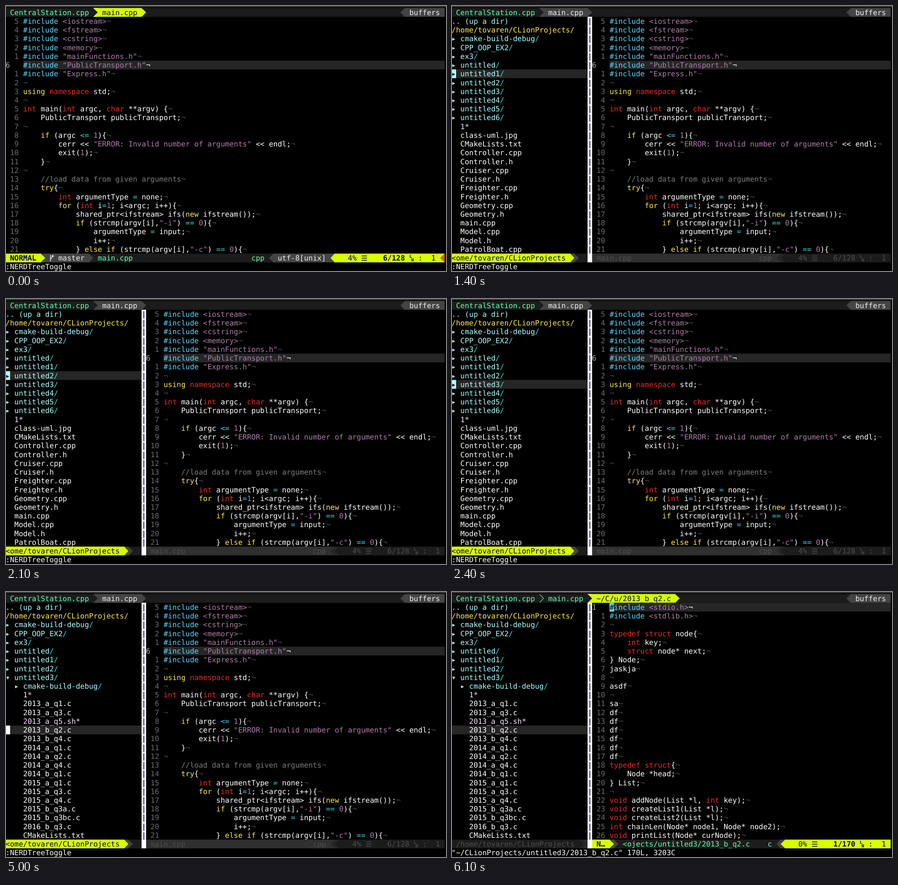
An HTML page that plays this animation: 964x581 px, repeating every 8000 ms.

```html
<!DOCTYPE html>
<html lang="en">
<head>
<meta charset="utf-8">
<title>Editor session</title>
<style>
html, body { margin: 0; width: 100%; height: 100%; overflow: hidden; background: #000; }
svg { display: block; width: 964px; height: 581px; }
text {
  font: 15.97px "DejaVu Sans Mono", monospace;
  white-space: pre;
  text-rendering: geometricPrecision;
}
.b { font-weight: bold; }
.s { font-size: 9.5px; font-weight: bold; }
</style>
</head>
<body>
<svg id="stage" viewBox="0 0 964 581"></svg>
<script>
const CW = 9.615, RH = 19.23, LEFT = -0.9, TOP = 4.4, BASE = 15.3, LOOP = 8000;
const STATUS = 28, CMD = 29, SPLIT = 31;
const C = {
  lime: '#d7ff00', navy: '#00005f', grey: '#444444', bar: '#1c1c1c', mid: '#262626',
  pale: '#303030', dim: '#4e4e4e', mint: '#5fffaf', white: '#ffffff', light: '#eeeeee',
  blue: '#5fd7ff', purple: '#ad7fa8', yellow: '#fce94f', red: '#ef2929', cyan: '#34e2e2',
  comment: '#7c7c7c', dir: '#afffff', exec: '#fbe6ff', orange: '#d75f00', line: '#262626',
  num: '#6c6c6c', curNum: '#a8a8a8', eol: '#4a4a4a', split: '#14143c'
};

const mainCode = `#include <iostream>
#include <fstream>
#include <cstring>
#include <memory>
#include "mainFunctions.h"
#include "PublicTransport.h"
#include "Express.h"

using namespace std;

int main(int argc, char **argv) {
    PublicTransport publicTransport;

    if (argc <= 1){
        cerr << "ERROR: Invalid number of arguments" << endl;
        exit(1);
    }

    //load data from given arguments
    try{
        int argumentType = none;
        for (int i=1; i<argc; i++){
            shared_ptr<ifstream> ifs(new ifstream());
            if (strcmp(argv[i],"-i") == 0){
                argumentType = input;
                i++;
            } else if (strcmp(argv[i],"-c") == 0){`.split('\n');

const listCode = `#include <stdio.h>
#include <stdlib.h>

typedef struct node{
    int key;
    struct node* next;
} Node;
jaskja

asdf

sa
df
df
df
df
df
df
typedef struct{
    Node *head;
} List;

void addNode(List *l, int key);
void createList1(List *l);
void createList2(List *l);
int chainLen(Node* node1, Node* node2);
void printList(Node* curNode);`.split('\n');

const home = '/home/tovaren/CLionProjects';
const dirs = ['cmake-build-debug', 'CPP_OOP_EX2', 'ex3', 'untitled', 'untitled1',
  'untitled2', 'untitled3', 'untitled4', 'untitled5', 'untitled6'].map(d => '▸ ' + d + '/');
const head = ['.. (up a dir)', home + '/'];
const closedTree = [...head, ...dirs, ...`1* class-uml.jpg CMakeLists.txt Controller.cpp
Controller.h Cruiser.cpp Cruiser.h Freighter.cpp Freighter.h Geometry.cpp Geometry.h main.cpp
Model.cpp Model.h PatrolBoat.cpp`.split(/\s+/).map(f => '  ' + f)];
const openTree = [...head, ...dirs.slice(0, 6), '▾ untitled3/', '  ▸ cmake-build-debug/',
  ...`1* 2013_a_q1.c 2013_a_q3.c 2013_a_q5.sh* 2013_b_q2.c 2013_b_q4.c 2014_a_q1.c 2014_a_q2.c
2014_a_q4.c 2014_b_q1.c 2015_a_q1.c 2015_a_q3.c 2015_a_q4.c 2015_b_q3a.c 2015_b_q3bc.c
2016_b_q3.c CMakeLists.txt`.split(/\s+/).map(f => '    ' + f)];

// Drawing helpers work in character cells: column, row.
const px = c => LEFT + c * CW, py = r => TOP + r * RH;
const esc = s => s.replace(/&/g, '&amp;').replace(/</g, '&lt;');

function text(c, r, s, fill, cls = '') {
  const x = px(c).toFixed(2), y = (py(r) + BASE).toFixed(2);
  return `<text x="${x}" y="${y}" fill="${fill}" class="${cls}">${esc(s)}</text>`;
}

// Columns snap to whole pixels so that neighbouring blocks join without seams.
function block(c0, c1, r, fill, rows = 1) {
  const x = Math.round(px(c0)), w = Math.round(px(c1)) - x;
  return `<rect x="${x}" y="${py(r)}" width="${w}" height="${rows * RH}" fill="${fill}"/>`;
}

function arrow(c, r, fill, back, left) {
  const base = Math.round(px(left ? c + 1 : c)), tip = Math.round(px(left ? c : c + 1));
  return block(c, c + 1, r, back) +
    `<path d="M${base} ${py(r)}L${tip} ${py(r + .5)}L${base} ${py(r + 1)}Z" fill="${fill}"/>`;
}

function stroke(c, r, d, color, width) {
  return `<path transform="translate(${px(c)} ${py(r)})" d="${d}" fill="none" ` +
    `stroke="${color}" stroke-width="${width}"/>`;
}

const syntax = new RegExp([
  /(?<comment>\/\/.*)/, /(?<blue>#include)/,
  /(?<purple>(?<=#include )<[^>]+>|"[^"]*"|\b\d+\b)/,
  /(?<yellow>\b(?:using|if|else|try|for|new)\b)/,
  /(?<red>\b(?:int|char|namespace|typedef|struct|void)\b)/,
  /(?<cyan><=|==|=)/
].map(x => x.source).join('|'), 'g');

function codeLine(c, r, s, current) {
  let out = '', at = 0;
  const plain = end => {
    const part = s.slice(at, end), lead = part.length - part.trimStart().length;
    if (part.trim()) out += text(c + at + lead, r, part.trim(), C.white);
  };
  for (const m of s.matchAll(syntax)) {
    plain(m.index);
    const kind = Object.keys(m.groups).find(k => m.groups[k]);
    out += text(c + m.index, r, m[0], C[kind]);
    at = m.index + m[0].length;
  }
  plain(s.length);
  return out + text(c + s.length, r, '¬', current ? C.white : C.eol);
}

function editor(c, lines, current, cursor) {
  let out = block(c + 4, 100, current, C.line);
  lines.forEach((s, i) => {
    const r = i + 1, here = r === current;
    const n = here ? String(current) : String(Math.abs(r - current)).padStart(3);
    const lead = n.length - n.trim().length;
    out += text(c + lead, r, n.trim(), here ? C.curNum : C.num) + codeLine(c + 4, r, s, here);
  });
  if (cursor) {
    out += block(c + 4, c + 5, current, C.blue) + text(c + 4, current, lines[current - 1][0], '#000');
  }
  return out;
}

function tree(lines, current, cursor) {
  let out = block(0, SPLIT, current, C.line);
  lines.forEach((s, i) => {
    const r = i + 1, c = s.search(/\S/), body = s.trim();
    if (i === 1) out += text(0, r, s, C.yellow);
    else if (i === 0) out += text(0, r, s, C.dir);
    else if (body.endsWith('/')) {
      out += text(c, r, body[0], C.dir) + text(c + 2, r, body.slice(2, -1), C.dir) +
        text(c + body.length - 1, r, '/', C.cyan);
    } else out += text(c, r, body, body.endsWith('*') ? C.exec : C.white);
  });
  if (cursor) {
    const mark = lines[current - 1][0];
    out += block(0, 1, current, mark === ' ' ? C.white : C.dir) + text(0, current, mark, '#000');
  }
  out += block(SPLIT, SPLIT + 1, 1, C.white, STATUS);
  for (let r = 1; r < STATUS; r++) out += text(SPLIT, r, '|', C.split, 'b');
  return out;
}

function tabs(mode) {
  let out = block(0, 100, 0, C.bar) + text(1, 0, 'CentralStation.cpp', C.mint);
  if (mode === 'list') {
    out += stroke(20, 0, `M.5 .5L9 ${RH / 2}L.5 ${RH - .5}`, C.mint, 1.1) +
      text(22, 0, 'main.cpp', C.mint) + block(31, 51, 0, C.lime) +
      arrow(31, 0, C.bar, C.lime) + text(33, 0, '~/C/u/2013_b_q2.c', C.navy) +
      arrow(51, 0, C.lime, C.bar);
  } else {
    const on = mode === 'main', back = on ? C.lime : C.grey;
    out += block(20, 31, 0, back) + arrow(20, 0, C.bar, back) +
      text(22, 0, 'main.cpp', on ? C.navy : C.light) + arrow(31, 0, back, C.bar);
  }
  return out + arrow(90, 0, C.grey, C.bar, true) + block(91, 100, 0, C.grey) +
    text(92, 0, 'buffers', C.light);
}

// Percentage, line count and column; c is the cell of the percent sign.
function position(c, percent, lines, color, cls) {
  const r = STATUS;
  const small = (s, dx, dy) =>
    `<text class="s" fill="${color}" x="${px(c + 13) + dx}" y="${py(r) + dy}">${s}</text>`;
  return text(c - 1, r, percent, color) +
    stroke(c + 2, r, 'M1.4 5.2H13M1.4 9.9H13M1.4 14.6H13', color, 1.6) +
    text(c + 7, r, lines, color, cls) + small('L', 0, 9.5) + small('N', 4, 17) +
    text(c + 15, r, ':', color) + text(c + 18, r, '1', color);
}

function mainStatus() {
  const r = STATUS;
  return block(0, 100, r, C.bar) + block(0, 8, r, C.lime) + text(1, r, 'NORMAL', C.navy, 'b') +
    arrow(8, r, C.lime, C.grey) + block(9, 19, r, C.grey) +
    stroke(10, r, 'M2.2 3V17M2.2 13C2.2 9 7.2 10.5 7.2 4.5M4.8 6.6L7.2 3.8L9.4 6.6', C.light, 1.5) +
    text(12, r, 'master', C.light) + arrow(19, r, C.grey, C.bar) +
    text(21, r, 'main.cpp', C.mint) + text(56, r, 'cpp', C.mint) +
    arrow(60, r, C.grey, C.bar, true) + block(61, 74, r, C.grey) +
    text(62, r, 'utf-8[unix]', C.light) + arrow(74, r, C.lime, C.grey, true) +
    block(75, 99, r, C.lime) + position(79, '4%', '6/128', C.navy, 'b') +
    arrow(99, r, C.orange, C.lime, true);
}

function treeStatus() {
  const r = STATUS;
  return block(0, SPLIT, r, C.bar) + block(0, 27, r, C.lime) +
    text(0, r, '<' + home.slice(2), C.navy) + arrow(27, r, C.lime, C.grey) +
    arrow(28, r, C.grey, C.bar) + block(32, 74, r, C.pale) +
    text(33, r, 'main.cpp', C.dim) + text(70, r, 'cpp', C.dim) +
    arrow(74, r, C.mid, C.pale, true) + arrow(75, r, C.bar, C.mid, true) +
    block(76, 100, r, C.bar) + position(80, '4%', '6/128', C.dim, '');
}

function listStatus() {
  const r = STATUS;
  return block(0, 29, r, C.bar) + text(1, r, home, C.dim) + arrow(29, r, C.bar, C.mid) +
    arrow(30, r, C.mid, C.pale) + block(32, 100, r, C.bar) + block(32, 36, r, C.lime) +
    text(33, r, 'N…', C.navy, 'b') + arrow(36, r, C.lime, C.grey) +
    arrow(37, r, C.grey, C.bar) + text(39, r, '<ojects/untitled3/2013_b_q2.c', C.mint) +
    text(72, r, 'c', C.mint) + arrow(74, r, C.grey, C.bar, true) +
    arrow(75, r, C.lime, C.grey, true) + block(76, 100, r, C.lime) +
    position(80, '0%', '1/170', C.navy, 'b');
}

const toggle = ':NERDTreeToggle';
const opened = '"~/CLionProjects/untitled3/2013_b_q2.c" 170L, 3203C';
const inMain = cursor => tabs('main') + editor(0, mainCode, 6, cursor) + mainStatus() +
  text(0, CMD, toggle, C.white);
const inTree = (lines, row, cursor = true, message = toggle) => tabs('tree') +
  editor(32, mainCode, 6, false) + tree(lines, row, cursor) + treeStatus() +
  text(0, CMD, message, C.white);
const inList = () => tabs('list') + editor(32, listCode, 1, true) +
  tree(openTree, 15, false) + listStatus() + text(0, CMD, opened, C.white);

const scenes = [
  [0, () => inMain(false)],
  [400, () => inMain(true)],
  [1200, () => inMain(false)],
  [1400, () => inTree(closedTree, 7)],
  [2000, () => inTree(closedTree, 8)],
  [2300, () => inTree(closedTree, 9)],
  [4300, () => inTree(openTree, 12)],
  [4500, () => inTree(openTree, 14)],
  [5000, () => inTree(openTree, 15)],
  [5700, () => inTree(openTree, 15, false, opened)],
  [6100, inList]
];

const stage = document.getElementById('stage');
const frame = '<rect width="964" height="581" fill="#000"/><rect width="964" height="2.5" fill="#3a3935"/>';
let shown = null;

function update(ms) {
  const scene = scenes.findLast(([start]) => ms >= start);
  if (scene === shown) return;
  shown = scene;
  stage.innerHTML = frame + scene[1]();
}

const began = performance.now();
function tick() {
  update((performance.now() - began) % LOOP);
  requestAnimationFrame(tick);
}
tick();
</script>
</body>
</html>
```
